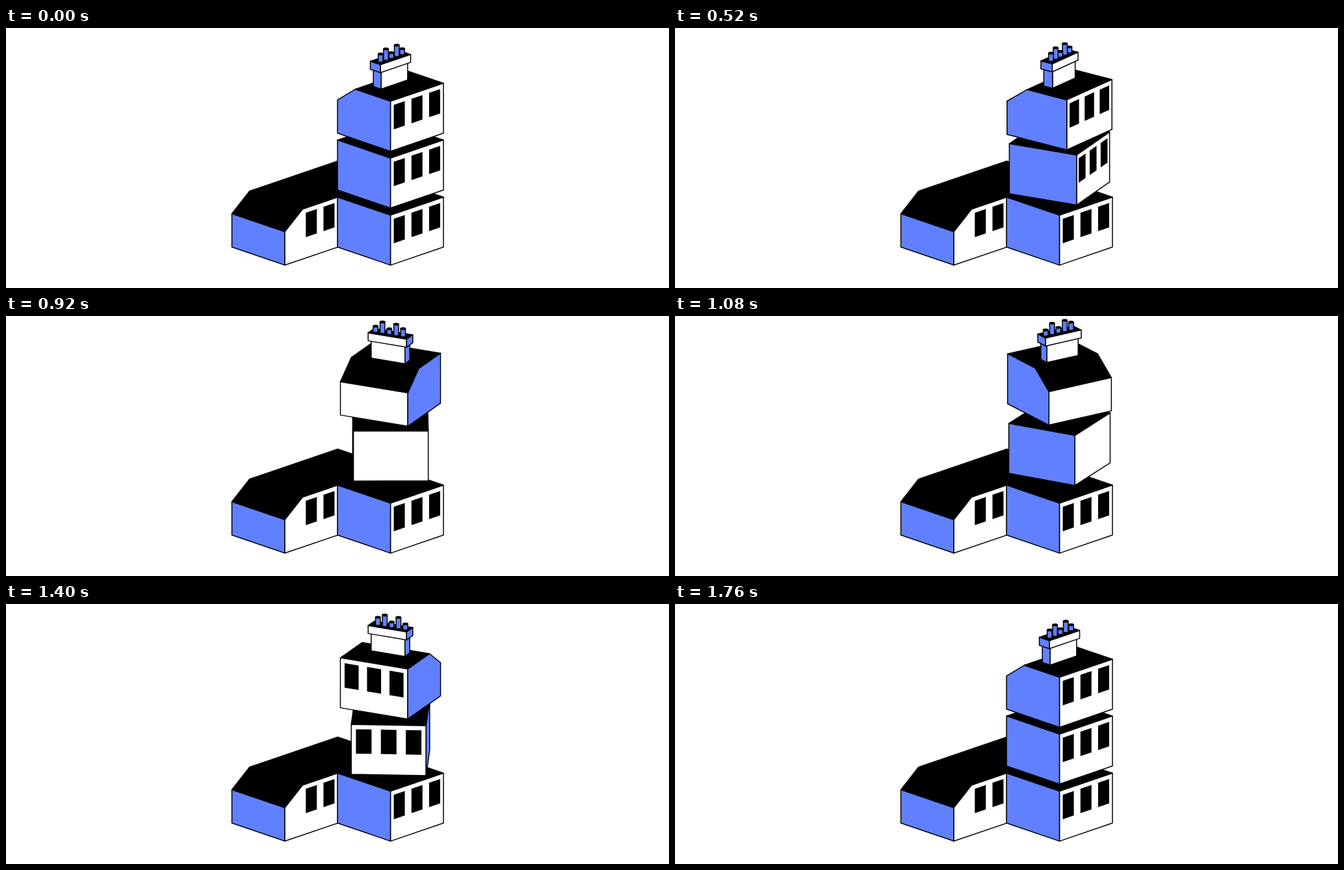
An HTML page for the animation above (2200 ms loop, 1020x400 px).

```html
<!DOCTYPE html>
<html lang="en">
<head>
<meta charset="utf-8">
<title>Turning tower</title>
<style>
  html, body { margin: 0; width: 100%; height: 100%; overflow: hidden; background: #fff; }
  svg { display: block; width: 1020px; height: 400px; }
</style>
</head>
<body>
<svg viewBox="0 0 1020 400" stroke="#000" stroke-width="1.5" stroke-linejoin="round">
  <g id="ground"></g>
  <g id="tower"></g>
</svg>
<script>
const BLUE = '#6080ff', WHITE = '#fff', BLACK = '#000';
const LOOP = 2200, STEP = 40, SPIN = 1360;
const CX = 591.5;       // axis of the tower
const HALF = 40.75;     // half a wall, measured across the screen
const TILT = 0.342;     // flattening of the ground plane
const WALL = 76.8;      // wall height on screen

const box = (half, low, high) => [[-half, low], [half, low], [half, high], [-half, high]];
const STOREY = box(HALF, 0, WALL);
const ATTIC = [[-HALF, 0], [HALF, 0], [HALF, WALL], [-HALF / 3, WALL], [-HALF, WALL * 2 / 3]];
const STACK = box(6, WALL, WALL + 28);
const CAP = box(7.75, WALL + 26.8, WALL + 39);
const POTS = [11.2, 16.3, 7.5, 16.2, 8];

const fmt = n => n.toFixed(2);
const poly = (pts, fill, attrs = '') =>
  `<polygon points="${pts.map(p => p.map(fmt).join()).join(' ')}" fill="${fill}" ${attrs}/>`;

// a runs along the blue walls, b along the white ones, z is up
function projector(baseY, angle) {
  const c = Math.cos(angle), s = Math.sin(angle);
  return (a, b, z) => {
    const u = a + b, v = a - b;
    return [CX + u * c + v * s, baseY + (v * c - u * s) * TILT - z];
  };
}

function facesViewer(pts) {
  let area = 0;
  pts.forEach(([x, y], i) => {
    const [nx, ny] = pts[(i + 1) % pts.length];
    area += x * ny - nx * y;
  });
  return area < 0;
}

// Extrudes a profile along b and draws the visible faces
function prism(at, profile, depth, windows) {
  let roof = '', walls = '';
  profile.forEach(([a, z], i) => {
    const [a2, z2] = profile[(i + 1) % profile.length];
    const pts = [at(a, -depth, z), at(a, depth, z), at(a2, depth, z2), at(a2, -depth, z2)];
    if (!facesViewer(pts)) return;
    if (a !== a2) {
      roof += poly(pts, BLACK);
      return;
    }
    walls += poly(pts, WHITE);
    if (windows && i === 1) walls += [-1, 0, 1].map(k => pane(at, k)).join('');
  });
  const front = profile.map(([a, z]) => at(a, -depth, z));
  const back = profile.map(([a, z]) => at(a, depth, z)).reverse();
  for (const end of [front, back]) if (facesViewer(end)) walls += poly(end, BLUE);
  return roof + walls;
}

function pane(at, k) {
  const mid = k * HALF * 2 / 3, w = 8.5, top = WALL - 7.2, bottom = WALL - 44.8;
  return poly([at(HALF, mid - w, bottom), at(HALF, mid + w, bottom),
    at(HALF, mid + w, top), at(HALF, mid - w, top)], BLACK, 'stroke="none"');
}

function pot([x, y], height) {
  const r = 3.7, ry = 1.4, top = y - height;
  return `<path d="M${fmt(x - r)} ${fmt(top)}V${fmt(y)}A${r} ${ry} 0 0 0 ${fmt(x + r)} ${fmt(y)}V${fmt(top)}Z" fill="${BLUE}"/>` +
    `<ellipse cx="${fmt(x)}" cy="${fmt(top)}" rx="${r}" ry="${ry}" fill="${BLACK}"/>`;
}

function chimney(at) {
  const pots = POTS
    .map((height, k) => ({ height, base: at(0, 1.4 + 8.3 * (k - 2), WALL + 39) }))
    .sort((p, q) => p.base[1] - q.base[1]);
  return prism(at, STACK, 20.4) + prism(at, CAP, 23.25) +
    pots.map(p => pot(p.base, p.height)).join('');
}

function drawGround() {
  const at = projector(337, 0);
  const wing = (a, b, z) => at(a, b - 4 * HALF, z);
  const h = HALF, low = WALL * 2 / 3, left = -3 * h;
  const p = (a, b, z) => at(a, b, z);
  // The wing lies along b, two cells deep, left of the tower
  const x = n => 347.5 + n * 81.5;
  const y = n => 337 + n * 27.8;
  const A = [x(0), y(0) - low], B = [x(1), y(1) - low];
  const ridgeL = [x(1 / 3), y(-1 / 3) - WALL], ridgeR = [x(4 / 3), y(2 / 3) - WALL];
  const inner = [x(2), y(0) - WALL], far = [x(2), y(-2) - WALL], side = [x(3), y(-1) - WALL];
  const slot = (n, z) => [x(1 + n), y(1 - n) - z];
  let out = poly([A, ridgeL, far, side, inner, ridgeR, B], BLACK);
  out += poly([A, B, [x(1), y(1)], [x(0), y(0)]], BLUE);
  out += poly([B, ridgeR, inner, [x(2), y(0)], [x(1), y(1)]], WHITE);
  for (const mid of [1 / 2, 5 / 6]) {
    const l = mid - 0.104, r = mid + 0.104, top = WALL - 7.2, bottom = WALL - 44.8;
    out += poly([slot(l, top), slot(r, top), slot(r, bottom), slot(l, bottom)], BLACK, 'stroke="none"');
  }
  return out + prism(at, STOREY, HALF, true);
}

const smooth = p => p * p * (3 - 2 * p);

// Turn and lift of a storey; the turn gathers speed a little late
function pose(t, start, baseY, lift) {
  const p = Math.min(1, Math.max(0, (t - start) / SPIN)), q = 1 - p;
  const late = p - p * q * (0.05 * q + 0.16 * p);
  return projector(baseY - lift * smooth(1 - Math.abs(2 * p - 1)), 2 * Math.PI * smooth(late));
}

function drawTower(t) {
  const middle = pose(t, 320, 249.2, 15.8);
  const top = pose(t, 393, 161.8, 21.3);
  return prism(middle, STOREY, HALF, true) + prism(top, ATTIC, HALF, true) + chimney(top);
}

const tower = document.getElementById('tower');
document.getElementById('ground').innerHTML = drawGround();

const begin = performance.now();
let shown = -1;
function tick() {
  const t = Math.max(0, performance.now() - begin) % LOOP;
  const held = Math.floor(t / STEP) * STEP;
  if (held !== shown) {
    shown = held;
    tower.innerHTML = drawTower(held);
  }
  requestAnimationFrame(tick);
}
tick();
</script>
</body>
</html>
```
